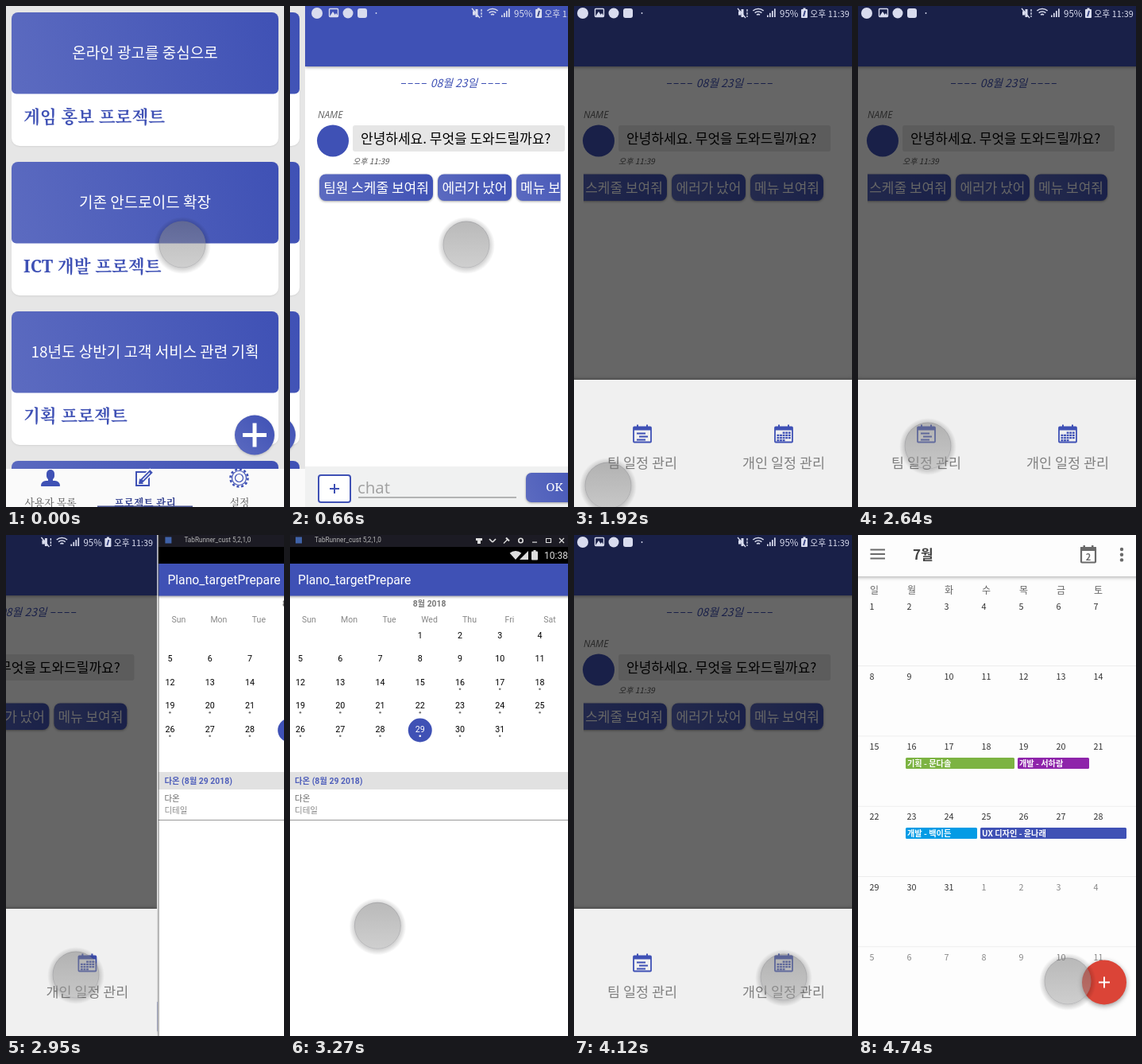
These frames come from a looping animation (350x630 px, 5070 ms). An HTML page with a canvas:

```html
<!DOCTYPE html>
<html lang="ko">
<head>
<meta charset="utf-8">
<style>
html, body { margin: 0; width: 100%; height: 100%; overflow: hidden; background: #fff; }
canvas { display: block; }
</style>
</head>
<body>
<canvas id="stage" width="350" height="630"></canvas>
<script>
const ctx = document.getElementById('stage').getContext('2d');
const LOOP = 5070;
const STEP = 78.7;
const PAGE = 355;
const BLUE = '#3f51b5';
const SANS = '"Noto Sans CJK KR", "Noto Sans", sans-serif';
const SERIF = '"Noto Serif", "Noto Serif CJK KR", "Noto Sans CJK KR", serif';
const ROBOTO = 'Roboto, "Noto Sans CJK KR", sans-serif';

const ramp = (t, start, length) => Math.min(1, Math.max(0, (t - start) / length));
const ease = (t, start, length) => (1 - Math.cos(Math.PI * ramp(t, start, length))) / 2;

// Position along the row of pages: list, chat, then agenda or month
function cameraAt(t) {
  const toChat = 331 * ease(t, 310, 340) + 23 * ease(t, 890, 230);
  return toChat + PAGE * (ease(t, 2737, 424) - ease(t, 3290, 355) + ease(t, 4380, 300));
}

// One touch presses and swipes, the next taps and swings over in an arc
function touchAt(t) {
  if (t < 1440) {
    return [222 - 40 * ease(t, 1110, 260), 300 - 64 * ease(t, 900, 240), 1 - ramp(t, 1340, 100)];
  }
  const tap = ease(t, 2000, 300);
  const swing = ramp(t, 3135, 920);
  const x = 43 + 45 * tap + 176 * swing;
  const y = 603 - 50 * tap - 120 * Math.sin(Math.PI * swing ** 0.85) + 3 * swing + 5 * ease(t, 4200, 150);
  return [x, y, ramp(t, 1440, 310)];
}

function rect(x, y, w, h, fill) {
  ctx.fillStyle = fill;
  ctx.fillRect(x, y, w, h);
}

function box(x, y, w, h, r, fill) {
  ctx.beginPath();
  ctx.roundRect(x, y, w, h, r);
  ctx.fillStyle = fill;
  ctx.fill();
}

function frame(x, y, w, h, r, color, width) {
  ctx.beginPath();
  ctx.roundRect(x, y, w, h, r);
  ctx.strokeStyle = color;
  ctx.lineWidth = width;
  ctx.stroke();
}

function disc(x, y, r, fill) {
  ctx.beginPath();
  ctx.arc(x, y, r, 0, Math.PI * 2);
  ctx.fillStyle = fill;
  ctx.fill();
}

function ring(x, y, r, color, width, from = 0, to = Math.PI * 2) {
  ctx.beginPath();
  ctx.arc(x, y, r, from, to);
  ctx.strokeStyle = color;
  ctx.lineWidth = width;
  ctx.stroke();
}

function line(x1, y1, x2, y2, color, width = 1) {
  ctx.beginPath();
  ctx.moveTo(x1, y1);
  ctx.lineTo(x2, y2);
  ctx.strokeStyle = color;
  ctx.lineWidth = width;
  ctx.stroke();
}

function triangle(x, y, w, h, tip, fill) {
  ctx.beginPath();
  ctx.moveTo(x, y);
  ctx.lineTo(x + w, y);
  ctx.lineTo(x + w * tip, y - h);
  ctx.fillStyle = fill;
  ctx.fill();
}

function text(s, x, y, font, color, align = 'left') {
  ctx.font = font;
  ctx.fillStyle = color;
  ctx.textAlign = align;
  ctx.fillText(s, x, y);
}

function plus(x, y, r, color, width) {
  line(x - r, y, x + r, y, color, width);
  line(x, y - r, x, y + r, color, width);
}

function dashed(pattern, draw) {
  ctx.setLineDash(pattern);
  draw();
  ctx.setLineDash([]);
}

function shadow(blur, dy, strength, draw) {
  ctx.save();
  ctx.shadowBlur = blur;
  ctx.shadowOffsetY = dy;
  ctx.shadowColor = `rgba(0,0,0,${strength})`;
  draw();
  ctx.restore();
}

function blend(x, y, w, h) {
  const g = ctx.createLinearGradient(x, y + h, x + w, y);
  g.addColorStop(0, '#5c6bc0');
  g.addColorStop(1, BLUE);
  return g;
}

function page(x, left, draw) {
  const right = 352;
  if (x + right <= 0 || x + left >= 350) return;
  ctx.save();
  ctx.translate(x, 0);
  ctx.beginPath();
  ctx.rect(left, 0, right - left, 630);
  ctx.clip();
  draw();
  ctx.restore();
}

function card(y, caption, title) {
  shadow(2, 1, 0.08, () => box(7, y, 336, 168, 10, '#fff'));
  box(7, y, 336, 102.5, [8, 8, 6, 6], blend(7, y, 336, 102));
  text(caption, 175, y + 58, '19px ' + SANS, '#fff', 'center');
  text(title, 22, y + 139, 'bold 21.6px ' + SERIF, BLUE);
}

function personIcon(x, y) {
  box(x - 5, y - 11, 10, 13, 5, BLUE);
  box(x - 3, y - 1, 6, 6, 0, BLUE);
  box(x - 12, y + 3, 24, 7, [8, 8, 1, 1], BLUE);
}

function editIcon(x, y) {
  frame(x - 10, y - 8, 16, 17, 0, BLUE, 2);
  line(x - 5, y + 5, x + 10, y - 10, '#fafafa', 8);
  line(x - 4, y + 4, x + 9, y - 9, BLUE, 5);
  line(x - 2, y + 2, x + 7, y - 7, '#fafafa', 1.2);
  triangle(x - 7, y + 7, 6, 7, 0.2, BLUE);
}

function gearIcon(x, y) {
  dashed([3, 2.76], () => ring(x, y, 11, BLUE, 2.6));
  ring(x, y, 9, BLUE, 1.2);
  ring(x, y, 5, BLUE, 1.2);
}

function drawList() {
  rect(0, 0, 352, 630, '#e6e6e6');
  [['온라인 광고를 중심으로', '게임 홍보 프로젝트'],
    ['기존 안드로이드 확장', 'ICT 개발 프로젝트'],
    ['18년도 상반기 고객 서비스 관련 기획', '기획 프로젝트'],
    ['', '']].forEach((labels, i) => card(8 + i * 188, ...labels));
  shadow(3, 1, 0.2, () => disc(313, 539.5, 25, blend(288, 515, 50, 50)));
  plus(313, 539.5, 15, '#fff', 5);

  rect(0, 582, 350, 48, '#fafafa');
  personIcon(56, 594);
  editIcon(174, 594);
  gearIcon(293.5, 593.5);
  text('사용자 목록', 56, 629, '12.8px ' + SERIF, '#555', 'center');
  text('프로젝트 관리', 175, 629, 'bold 12.8px ' + SERIF, '#2c3a8c', 'center');
  text('설정', 294, 629, '12.8px ' + SERIF, '#555', 'center');
  rect(115, 628.5, 120, 1.5, '#444f8a');
}

function battery(x, y, w, h, color) {
  box(x, y, w, h, 1, color);
  rect(x + w / 2 - 1.5, y - 1.5, 3, 2, color);
}

function drawStatus() {
  const c = '#d9dcee';
  disc(11, 9, 7, c);
  frame(26.5, 3.5, 11, 10, 1, c, 1.4);
  triangle(27, 13, 8, 6, 0.5, c);
  triangle(32, 13, 6, 4, 0.5, c);
  disc(50, 9, 6.5, c);
  box(62, 3, 12, 12, 3, c);
  disc(85.5, 9, 0.9, c);

  rect(207, 6.5, 3.5, 5, c);
  line(212, 4, 212, 14, c, 3);
  line(206, 3, 216, 15, c, 1.3);
  dashed([3, 1], () => line(218, 4, 218, 14, c, 1.3));
  for (const r of [3, 6.5, 10]) ring(232, 13.5, r, c, 1.5, -2.3, -0.84);
  for (let i = 0; i < 4; i++) rect(243 + i * 3, 11.5 - i * 2.7, 1.7, 2.5 + i * 2.7, c);
  text('95%', 259, 14, '11.5px ' + SANS, c);
  battery(286, 4, 8, 11, c);
  line(291, 6, 289, 13, '#333f80', 1.8);
  text('오후 11:39', 322, 14, '10.8px ' + SANS, c, 'center');
}

function chip(x, w, label) {
  shadow(3, 1, 0.35, () => box(x, 211.5, w, 33.5, 8, blend(x, 211, w, 34)));
  text(label, x + w / 2, 235, '17px ' + SANS, '#fff', 'center');
}

function calendarIcon(x, y) {
  frame(x - 11, y - 9, 22, 19, 1, BLUE, 1.8);
  rect(x - 11, y - 9, 22, 4, BLUE);
  for (const side of [-7, 5]) rect(x + side, y - 12, 2, 5, BLUE);
}

function drawSheet() {
  rect(-4, 0, 356, 630, 'rgba(0,0,0,.6)');
  shadow(5, 0, 0.5, () => rect(-4, 470, 356, 160, '#f0f0f0'));
  calendarIcon(86, 538.5);
  for (let i = 0; i < 3; i++) rect(79 + i % 2 * 3, 536.5 + i * 4, 11, 2, BLUE);
  calendarIcon(264, 538.5);
  for (let i = 2; i < 18; i++) rect(255.5 + i % 5 * 3.6, 535.5 + (i / 5 | 0) * 3.2, 2.8, 2.3, BLUE);
  text('팀 일정 관리', 86, 580.5, '17.4px ' + SANS, '#808080', 'center');
  text('개인 일정 관리', 264, 580.5, '17.4px ' + SANS, '#808080', 'center');
}

function drawChat(scroll, sheet) {
  rect(-4, 0, 356, 630, '#fff');
  shadow(4, 1, 0.4, () => rect(-4, 0, 356, 76, BLUE));

  text('08월 23일', 183.5, 102, 'italic 500 13.9px ' + SANS, BLUE, 'center');
  dashed([6, 2.6], () => {
    for (const x of [117, 218]) line(x, 97.5, x + 32, 97.5, BLUE, 1.2);
  });

  text('NAME', 12, 140.5, 'italic 12px "Open Sans", sans-serif', '#666');
  disc(31, 169.5, 20, BLUE);
  box(56, 150, 267, 33, 3, '#e6e6e6');
  text('안녕하세요. 무엇을 도와드릴까요?', 66, 173, '500 17px ' + SANS, '#000');
  text('오후 11:39', 56, 199, 'italic 10px ' + SANS, '#555');

  ctx.save();
  ctx.beginPath();
  ctx.rect(12, 205, 305.5, 46);
  ctx.clip();
  chip(14 + scroll, 143, '팀원 스케줄 보여줘');
  chip(163 + scroll, 93, '에러가 났어');
  chip(262 + scroll, 92, '메뉴 보여줘');
  ctx.restore();

  rect(-4, 579, 356, 51, '#f0f1f1');
  box(13, 590, 40, 34, 3, '#fff');
  frame(13, 590, 40, 34, 3, BLUE, 2);
  plus(33, 607, 6, BLUE, 2);
  text('chat', 62, 613, '20.5px "Open Sans", sans-serif', '#a0a0a0');
  rect(63, 617.5, 199, 1, '#777');
  shadow(3, 1, 0.35, () => box(274, 587, 90, 37, 7, blend(274, 587, 90, 37)));
  text('OK', 310, 610, '15px "Noto Serif", serif', '#fff', 'center');

  if (sheet) drawSheet();
  drawStatus();
}

function windowIcons(c) {
  rect(234, 4, 8, 3, c);
  rect(236, 6, 4, 5, c);
  line(251, 5, 255, 9, c, 1.7);
  line(255, 9, 259, 5, c, 1.7);
  line(269, 10.5, 274, 5.5, c, 1.2);
  line(272, 3.5, 276, 7.5, c, 2);
  ring(290.5, 7, 2.7, c, 1.6);
  rect(305, 8.5, 6, 1.2, c);
  frame(322.5, 4.5, 6, 5, 0, c, 1.1);
  line(339, 4, 345, 10, c, 1.2);
  line(345, 4, 339, 10, c, 1.2);
}

function drawAgenda() {
  rect(-2, 0, 356, 630, '#fff');
  rect(-2, 0, 356, 15, '#1c1b24');
  rect(7, 2.5, 8, 8, '#3f62a8');
  text('TabRunner_cust 5,2,1,0', 31, 8.8, '8.2px ' + ROBOTO, '#b5b5b5');
  windowIcons('#ddd');

  rect(-2, 15, 356, 21, '#000');
  ring(284, 31, 5.5, '#ddd', 11, -2.3, -0.84);
  triangle(289, 31, 11, 11, 1, '#ddd');
  battery(304, 20.5, 8, 11, '#ddd');
  text('10:38', 320, 30, '12px ' + ROBOTO, '#ddd');

  shadow(3, 1, 0.35, () => rect(-2, 36, 356, 40.5, BLUE));
  text('Plano_targetPrepare', 10, 61.5, '15.7px ' + ROBOTO, '#fff');
  text('8월 2018', 175.5, 90, 'bold 10.3px ' + ROBOTO, '#777', 'center');
  'Sun Mon Tue Wed Thu Fri Sat'.split(' ').forEach((day, i) =>
    text(day, 24 + i * 50.5, 110, '10.5px ' + ROBOTO, '#888', 'center'));
  for (let d = 1; d <= 31; d++) {
    const cell = d + 2;
    const x = 13 + cell % 7 * 50.25, y = 126 + (cell / 7 | 0) * 29.5;
    const on = d === 29;
    if (on) disc(x, y + 1.5, 15, BLUE);
    text(d, x, y + 3.8, '10.7px ' + ROBOTO, on ? '#fff' : '#000', 'center');
    if (d > 15) disc(x, y + 8.7, 1.3, on ? '#fff' : '#777');
  }

  rect(-2, 298, 356, 22, '#e1e1e1');
  text('다온 (8월 29 2018)', 6, 313, 'bold 10.4px ' + ROBOTO, '#4f5fbb');
  text('다온', 6, 335, '500 10.5px ' + ROBOTO, '#666');
  text('디테일', 6, 349.5, '10.5px ' + ROBOTO, '#888');
  rect(-2, 358, 356, 1, '#999');
  rect(-2, 0, 1, 630, '#444');
}

// Bar from one day of the month over a number of days
function eventBar(day, days, color, label) {
  const x = 13 + (day - 1) % 7 * 47, y = 104 + ((day - 1) / 7 | 0) * 88;
  box(x, y, days * 47 - 4, 14, 1.5, color);
  text(label, x + 2, y + 11, 'bold 10.2px ' + SANS, '#fff');
}

function drawMonth() {
  rect(-2, 0, 356, 630, '#fdfdfd');
  shadow(5, 1, 0.35, () => rect(-4, 0, 362, 52, '#fdfdfd'));
  const c = '#6a6a6a';
  for (let i = 0; i < 3; i++) {
    rect(15.5, 17.5 + i * 5.5, 18.5, 2, c);
    disc(332, 18 + i * 6.7, 2.2, c);
  }
  text('7월', 69, 31, 'bold 17px ' + SANS, '#444');
  frame(281, 16, 18, 18.5, 1, c, 2.2);
  rect(280, 15, 20, 5, c);
  for (const x of [283.5, 294]) rect(x, 13, 2.5, 3, c);
  text('2', 290, 31.5, 'bold 11px ' + SANS, c, 'center');

  [...'일월화수목금토'].forEach((day, i) =>
    text(day, 15 + i * 47, 74, '500 12px ' + SANS, '#666'));
  for (let i = 0; i < 42; i++) {
    const row = i / 7 | 0, next = i > 30;
    text(i % 31 + 1, 14.5 + i % 7 * 47, 93.5 + row * 88.3, '10.8px ' + SANS, next ? '#888' : '#333');
    if (i % 7 === 0 && row) rect(0, 75.8 + row * 88.3, 354, 1, '#ededed');
  }
  eventBar(16, 3, '#7cb342', '기획 - 문다솔');
  eventBar(19, 2, '#8e24aa', '개발 - 서하람');
  eventBar(23, 2, '#039be5', '개발 - 백이든');
  eventBar(25, 4, BLUE, 'UX 디자인 - 윤나래');
  shadow(6, 2, 0.4, () => disc(310, 562.5, 28, '#db4437'));
  plus(310, 562.5, 7, '#fff', 2);
}

function drawTouch(x, y, alpha) {
  ctx.save();
  ctx.globalAlpha = alpha;
  const halo = ctx.createRadialGradient(x, y + 1, 28, x, y + 1, 36);
  halo.addColorStop(0, 'rgba(0,0,0,.2)');
  halo.addColorStop(1, 'rgba(0,0,0,0)');
  ctx.beginPath();
  ctx.arc(x, y + 1, 36, 0, Math.PI * 2);
  ctx.arc(x, y, 29.5, 0, Math.PI * 2, true);
  ctx.fillStyle = halo;
  ctx.fill();
  const g = ctx.createLinearGradient(0, y - 30, 0, y + 30);
  g.addColorStop(0, 'rgba(116,116,116,.5)');
  g.addColorStop(1, 'rgba(160,160,160,.5)');
  disc(x, y, 29.5, g);
  ring(x, y, 29, 'rgba(110,110,120,.2)', 1);
  ctx.restore();
}

function draw(time) {
  const t = Math.max(0, 25 + STEP * Math.floor((time - 15) / STEP));
  const camera = cameraAt(t);
  rect(0, 0, 350, 630, '#fff');
  page(-camera, 0, drawList);
  page(PAGE - 1 - camera, -4, () => drawChat(-40 * ease(t, 1110, 260), t > 1900));
  page(PAGE * 2 - 1 - camera, -2, t < 4000 ? drawAgenda : drawMonth);
  drawTouch(...touchAt(t));
}

const start = performance.now();
function tick() {
  draw((performance.now() - start) % LOOP);
  requestAnimationFrame(tick);
}
tick();
</script>
</body>
</html>
```
